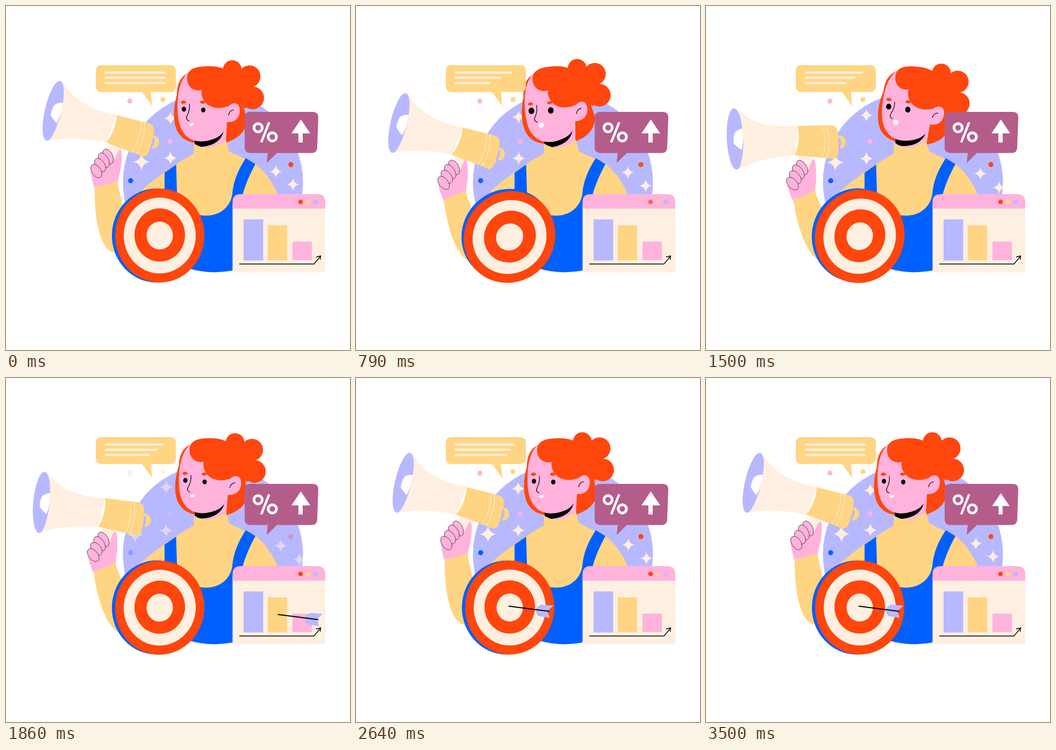
Write an HTML page that moves like this. It is 640 px wide and 640 px high and loops after 3570 ms.

```html
<!DOCTYPE html>
<html lang="en">
<head>
<meta charset="utf-8">
<title>Marketing</title>
<style>
html, body { margin: 0; width: 100%; height: 100%; overflow: hidden; background: #fff; }
svg { display: block; width: 100%; height: 100%; }
.red { fill: #ff460c } .blue { fill: #0060ff } .lav { fill: #b8b8ff }
.yel { fill: #ffd583 } .cream { fill: #ffefe1 } .pink { fill: #ffb3dc }
.white { fill: #fff } .line { fill: none; stroke: #000 }
</style>
</head>
<body>
<svg viewBox="0 0 640 640">
  <circle class="lav" cx="385" cy="328" r="167.5"/>
  <g id="stars" class="cream"></g>
  <g id="dots">
    <circle class="pink" cx="230.500" cy="177" r="4.700"/>
    <circle class="yel" cx="292" cy="174" r="4.700"/>
    <circle class="pink" cx="305" cy="252" r="4.700"/>
    <circle class="blue" cx="232" cy="325" r="4.700"/>
    <circle class="red" cx="530" cy="295" r="4.700"/>
  </g>

  <g id="head">
    <path class="red" d="M345 122C325 128 318 145 318 165C312 185 309 215 320 235C328 248 340 253 352 255L409 254C435 246 447 232 448 210L440 180Z"/>
    <path class="pink" d="M352 240L412 200L409 254Q380 272 351 262Z"/>
    <path d="M351 248C375 255 398 246 405 233Q399 258 365 262Q355 262 351 257Z"/>
    <path class="pink" d="M338 124C322 140 319 165 319 190C319 226 332 251 362 252C386 252 402 240 411 216C424 217 434 210 435 196C436 176 418 178 413 188L410 140Z"/>
    <path class="line" stroke-width="1.2" d="M414 203Q416 194 424 193M341 182C343 192 339 200 337 204Q333 211 341 214"/>
    <g class="red">
      <circle cx="421" cy="118.500" r="17.500"/>
      <circle cx="453" cy="131" r="20.500"/>
      <circle cx="459" cy="171" r="21"/>
      <path d="M337 136C335 112 365 112 380 112C395 112 404 116 410 120L455 130L462 175L445 191C438 180 428 177 418 183C405 193 380 192 370 178C364 170 363 163 364 156C350 160 337 150 337 136Z"/>
      <path d="M325 180Q326 176 330 176Q335 176 335 180Q330 184 325 180ZM361 180Q361 176 366 176Q370 176 371 180Q366 184 361 180Z"/>
    </g>
    <g id="eyes">
      <ellipse rx="4" ry="4.500"/>
      <ellipse rx="4" ry="4.500"/>
    </g>
    <path id="smile" class="white" d="M340 219Q345 219 350 217Q350 223 345 223.500Q342 223 340 219Z"/>
    <circle id="gasp" class="white" cx="347.500" cy="219.500" r="5"/>
  </g>

  <path class="yel" d="M350 256Q378 274 409 249L415 270C430 279 450 285 464 294C485 310 500 335 506 352L421 480H250V345C275 322 320 290 349 275Z"/>
  <path class="blue" d="M316.500 295L318 345C322 375 345 390 372 390C400 390 418 372 421 350C423 325 432 305 446 283L464 294C450 320 443 340 440 352L422 360V492Q380 500 340 488L295 400V310Z"/>

  <g id="horn">
    <path class="cream" d="M193 254L215 264L205 292L188 290Z"/>
    <ellipse class="yel" cx="274" cy="253" rx="11" ry="12"/>
    <ellipse class="lav" cx="271" cy="255" rx="4.500" ry="11" transform="rotate(17 271 255)"/>
    <ellipse class="lav" cx="88" cy="195" rx="15.700" ry="57" transform="rotate(13 88 195)"/>
    <path class="white" d="M106 180Q92 179 88 187Q84 195 83 203Q88 212 94 218Q104 200 106 180Z"/>
    <path class="cream" d="M107 139C113 158 130 175 160 189C175 196 195 201 206 203L186 254C150 247 110 243 79 251C95 235 112 180 107 139Z"/>
    <path class="yel" d="M206 203C225 208 250 214 268 219Q276 222 275 233C273 250 268 266 264 275Q261 281 252 279L186 254C198 240 205 222 206 203Z"/>
    <path fill="none" stroke="#ffefe1" d="M251 215Q252 245 235 272M258 217Q259 247 243 275"/>
  </g>
  <g id="hand">
    <path class="pink" d="M165 340C160 325 158 315 158 300L175 285L195 292C203 288 206 272 212 267C217 268 216 285 214 298C213 310 208 320 208 332Z"/>
    <g id="fingers" class="pink" stroke="#222" stroke-width=".7"></g>
  </g>
  <path id="sleeve" class="yel" d="M165 337Q190 333 207 325C211 350 217 365 217 380L225 459H203C180 458 164 410 165 337Z"/>

  <g id="target">
    <ellipse class="blue" cx="280" cy="427" rx="83" ry="87.500"/>
    <ellipse class="red" cx="286" cy="427" rx="83" ry="87.500"/>
    <ellipse class="cream" cx="286" cy="427" rx="67" ry="70.500"/>
    <ellipse class="red" cx="286" cy="426" rx="47" ry="49.500"/>
    <ellipse class="cream" cx="286" cy="427" rx="24.500" ry="26"/>
  </g>

  <path class="cream" d="M421.500 370H594V495.500H421.500Z"/>
  <path class="pink" d="M421.500 377V365Q421.500 350 436.500 350H579Q594 350 594 365V377Z"/>
  <g id="lights">
    <circle class="red" cx="548" cy="364.500" r="4.300"/>
    <circle class="yel" cx="562" cy="364.500" r="4.300"/>
    <circle class="lav" cx="576" cy="364.500" r="4.300"/>
  </g>
  <path class="lav" d="M442 397H478.500V473.500H442Z"/>
  <path class="yel" d="M487 408H523V473.500H487Z"/>
  <path class="pink" d="M533 438.500H569V473H533Z"/>
  <path id="trend" class="line" stroke-width="1.4" pathLength="100" stroke-dasharray="100 200" d="M434 480H573L585.500 465"/>
  <path id="tip" class="line" stroke-width="1.4" d="M577 467L585.500 465L584.500 472"/>

  <path fill="#b55d8a" d="M455 197H571Q581 197 581 207L579 263Q579 273 569 273.500H504L485 292L487 273.500H455Q444 273 444 263V207Q444 197 455 197Z"/>
  <g id="percent" fill="none" stroke="#fff" stroke-width="5">
    <circle cx="469" cy="226.500" r="7.700"/>
    <circle cx="495.500" cy="243.500" r="7.700"/>
    <path stroke-width="4.500" stroke-linecap="round" d="M489 218L475.500 252"/>
  </g>
  <path id="up" class="white" d="M548.500 211L566 237H552V254H544V237H531Z"/>

  <path class="yel" d="M178 110H305Q316 110 316 121V149Q316 160 305 160H269.500L272 186L253 160H178Q167 160 167 149V121Q167 110 178 110Z"/>
  <g id="text" class="cream"></g>

  <g id="dart">
    <path class="lav" d="M48 6L59 -3L83 -1L72 9L76 22L54 18Z"/>
    <path class="line" stroke-width="2" stroke-linecap="round" d="M0 0L74 9.500"/>
  </g>
</svg>
<script>
const LOOP = 3570;
const $ = id => document.getElementById(id);
const set = (el, name, value) => el.setAttribute(name, value);
const move = (id, value) => set($(id), 'transform', value);

function add(parent, tag, attrs) {
  const el = document.createElementNS('http://www.w3.org/2000/svg', tag);
  for (const k in attrs) set(el, k, attrs[k]);
  return $(parent).appendChild(el);
}

// Eased value from pairs of time and value
function key(t, ...k) {
  if (t <= k[0]) return k[1];
  for (let i = 2; i < k.length; i += 2) {
    if (t < k[i]) {
      const p = (t - k[i - 2]) / (k[i] - k[i - 2]);
      return k[i - 1] + (k[i + 1] - k[i - 1]) * p * p * (3 - 2 * p);
    }
  }
  return k[k.length - 1];
}

// 1 away from the given times, falling to low at each of them
const dip = (t, half, low, ...at) =>
  Math.min(1, ...at.map(c => low + (1 - low) * Math.abs(t - c) / half));

// x, y, size, drift x, drift y
const stars = [
  [252, 290, 15, -12, 1], [306, 209, 12, -8, -6], [306, 283, 12, -8, 1],
  [502, 308, 11.5, 9, 4], [534, 332, 11.5, 12, 6]
].map(([x, y, s, dx, dy]) => {
  const q = s * .17;
  const d = `M0 ${-s}Q${q} ${-q} ${s} 0Q${q} ${q} 0 ${s}Q${-q} ${q} ${-s} 0Q${-q} ${-q} 0 ${-s}`;
  return { x, y, dx, dy, el: add('stars', 'path', { d }) };
});

[[190, 280, 15, -25], [182, 287, 15, -28], [175, 296, 14, -33], [168, 307, 14, -33]]
  .forEach(([x, y, ry, a]) => add('fingers', 'ellipse',
    { cx: x, cy: y, rx: 8.5, ry, transform: `rotate(${a} ${x} ${y})` }));

const lines = [0, 1, 2].map(i =>
  add('text', 'rect', { x: 184, y: 121.8 + i * 9.8, height: 4 }));

function draw(t) {
  const drift = Math.sin(Math.PI * t / LOOP) ** 2;
  for (const s of stars)
    set(s.el, 'transform', `translate(${s.x + s.dx * drift} ${s.y + s.dy * drift})`);
  set($('stars'), 'opacity', dip(t, 320, .55, 500, 1850, 3200));
  set($('dots'), 'opacity', dip(t, 320, .25, 500, 1850, 3200));

  // Head
  move('head', `rotate(${key(t, 0, 0, 680, -5, 1250, 8.3, 2150, 0)} 377 265)`);
  const awe = key(t, 300, 0, 720, 1, 1300, 1, 1800, 0);
  [...$('eyes').children].forEach((eye, i) => set(eye, 'transform',
    `translate(${331 + i * 36} ${192 + i * 1.5}) scale(${1 + .33 * awe})`));
  set($('gasp'), 'opacity', awe > .5 ? 1 : 0);
  set($('smile'), 'opacity', awe > .5 ? 0 : 1);

  // Arm and megaphone
  const low = key(t, 570, 0, 790, 1, 2230, 1, 2620, 0);
  const tilt = key(t, 800, 0, 1240, -36, 1720, 0, 2230, -41, 2620, 0);
  const wrist = `translate(${186 - 3 * low + tilt * .06} ${331 + 20.5 * low})`;
  const place = (at, turn, x, y) => `${at} rotate(${turn}) translate(${-x} ${-y})`;
  move('sleeve', place(wrist, -8.5 * low + tilt * .08, 186, 331));
  move('hand', place(wrist, -5 * low - tilt * tilt * .0135, 186, 331));
  move('horn', place(`translate(${185 - 8 * low + tilt * .28 * low} ${287 + 22.7 * low})`, tilt, 185, 287));

  // Target and dart
  const spin = key(t, 0, 0, 780, 45, 2150, 0);
  move('target', `translate(0 ${spin / 22}) rotate(${spin} 285 427)`);
  const far = t < 1860 ? 223 + (1860 - t) * 1.2 : Math.max(0, 223 - (t - 1860) * 1.1);
  const size = key(t, 2040, 1, 2200, 1.2, 2380, 1);
  move('dart', `translate(${284.5 + far} ${424.5 + far * .07}) scale(${size})`);
  set($('dart'), 'opacity', t > 1740 ? 1 : 0);

  // Chart window
  const blinks = [[640, 2240], [870, 2530], [1010, 2800]];
  [...$('lights').children].forEach((el, i) => set(el, 'opacity', dip(t, 220, .05, ...blinks[i])));
  const drawn = t < 60 ? 1 : t < 680 ? (t - 60) / 620
    : t < 2800 ? 1 : Math.min(1, (t - 2800) / 690);
  set($('trend'), 'stroke-dashoffset', 100 - 100 * drawn);
  set($('tip'), 'opacity', drawn < 1 ? 0 : 1);

  // Badge and message
  const pulse = dip(t, 300, .2, 3230);
  set($('percent'), 'opacity', pulse);
  move('up', `translate(548.5 254) scale(${pulse}) translate(-548.5 -254)`);
  const short = t < 700 ? t / 700 : (LOOP - t) / (LOOP - 700);
  lines.forEach((el, i) => set(el, 'width', 113 - [7, 27, 50][i] * short));
}

function tick(now) {
  draw(now % LOOP);
  requestAnimationFrame(tick);
}
draw(0);
requestAnimationFrame(tick);
</script>
</body>
</html>
```
